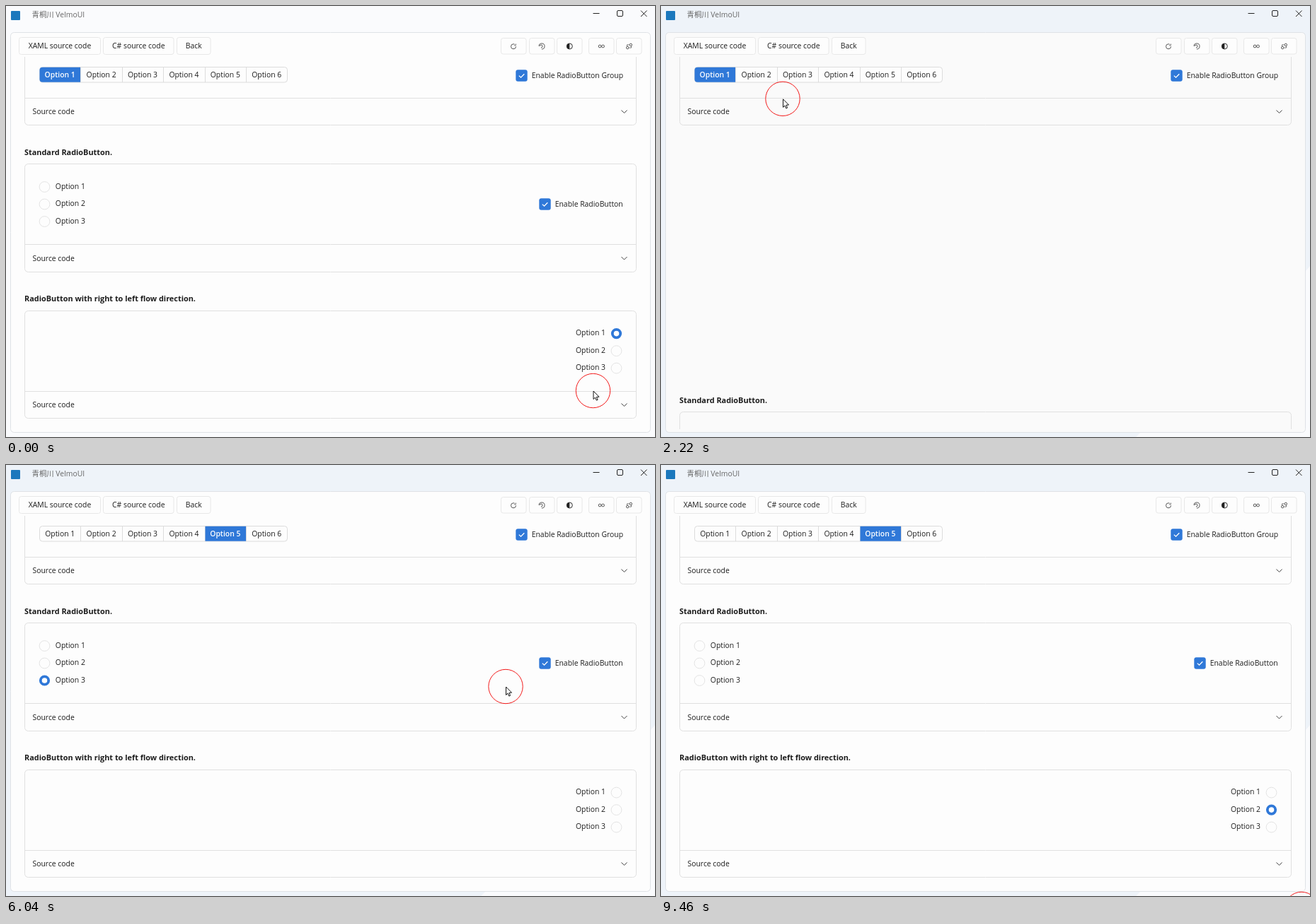
Animation, 917 px wide and 610 px high, one loop 9620 ms. Source, as an HTML page with a canvas:

```html
<!DOCTYPE html>
<html lang="en">
<head>
<meta charset="utf-8">
<title>Radio buttons</title>
<style>
html, body { margin: 0; width: 100%; height: 100%; overflow: hidden; background: #eef3f9; }
canvas { display: block; width: 917px; height: 610px; }
</style>
</head>
<body>
<canvas id="stage" width="917" height="610"></canvas>
<script>
const g = document.getElementById('stage').getContext('2d');
const LOOP = 9620, SHIFT = 351, SEG = 58.4, ROW = 24.5;
const BLUE = '#2f78d8', LINE = '#e0e0e0', INK = '#1c1c1c', FACE = '#fdfdfd';
const SANS = '"Open Sans", "Noto Sans", "Noto Sans CJK SC", "Noto Sans CJK", sans-serif';
const MONO = '"DejaVu Sans Mono", monospace';

// Press time, release time, control: kind letter and index
const clicks = [
  [900, 1000, 'h0'], [1700, 1750, 'h0'], [2500, 2550, 'g1'], [2970, 3020, 'g2'], [3250, 3300, 'g3'],
  [4100, 4150, 'g4'], [4780, 4990, 's1'], [5150, 5250, 's0'], [5410, 5500, 's2'],
  [6400, 6500, 'e0'], [6950, 7000, 'e0'], [7180, 7660, 'r2'], [7880, 8000, 'r1']
];
const OPEN = clicks[0][1], CLOSE = clicks[1][1], SNAP = CLOSE + 550;

const spots = {
  h: () => [806, 154],
  g: i => [47 + SEG * (i + .45), 98],
  s: i => [90, 256 + ROW * i],
  r: i => [866, 463 + ROW * i],
  e: () => [789.5, 283]
};

// Arrival, departure, position; clicks supply the remaining stops
const path = [
  [0, 50, 829.5, 544.5], [300, 450, 777.5, 262.5], [2220, 2240, 172, 131.3], [3650, 3790, 354, 103],
  [4680, 4690, 118, 293], [5940, 5950, 640, 360], [6040, 6060, 706, 313.5], [8300, 8350, 850, 588],
  [8850, 8870, 735, 488], [9010, 9360, 740, 640], [9450, LOOP, 905, 628.5],
  ...clicks.map(([a, b, id]) => [a, b, ...spots[id[0]](+id[1])])
].sort((a, b) => a[0] - b[0]);

const code = `<Grid
  Margin="10"
 >
  <Grid.ColumnDefinitions>
    <ColumnDefinition
      Width="*" />
    <ColumnDefinition
      Width="Auto" />
  </Grid.ColumnDefinitions>
  <StackPanel
    Grid.Column="0">
    <ui:ButtonGroup
      HorizontalAlignment="Left"
      CornerRadius="5"
      Orientation="Horizontal"
      Layout="Uniform"
      IsEnabled="{Binding IsChecked,ElementName=RadioGroupButtonEnabled, Mode=OneWay}"
     >
      <RadioButton
        Content="Option 1"
        GroupName="radio_group_one"
        IsChecked="True" />
      <RadioButton
        Content="Option 2"
        GroupName="radio_group_one" />`.split('\n');

const clamp = v => Math.max(0, Math.min(1, v));
const done = (kinds, t) => clicks.filter(c => c[1] <= t && kinds.includes(c[2][0]));
const chosen = (kinds, t, first) => (done(kinds, t).pop() || [0, 0, first])[2];
const held = (id, t) => clicks.some(c => c[2] === id && t >= c[0] && t < c[1]);

function pointer(t) {
  const n = path.findIndex(p => p[0] > t);
  const a = path[(n < 0 ? path.length : n) - 1], b = n < 0 ? a : path[n];
  const k = clamp((t - a[1]) / (b[0] - a[1] || 1));
  return [2, 3].map(i => a[i] + (b[i] - a[i]) * k);
}

function text(s, x, cy, { color = INK, size = 10.4, weight = 400, align = 'left' } = {}) {
  g.font = `${weight} ${size}px ${SANS}`;
  g.fillStyle = color;
  g.textAlign = align;
  g.fillText(s, x, cy + 3.7);
}

function paint(fill, stroke, width = 1) {
  if (fill) { g.fillStyle = fill; g.fill(); }
  if (stroke) { g.strokeStyle = stroke; g.lineWidth = width; g.stroke(); }
}

function box(x, y, w, h, r, fill, stroke) {
  g.beginPath();
  g.roundRect(x, y, w, h, r);
  paint(fill, stroke);
}

function arc(x, y, r, from, to, fill, stroke, width) {
  g.beginPath();
  g.arc(x, y, r, from, to);
  paint(fill, stroke, width);
}

const disc = (x, y, r, ...style) => arc(x, y, r, 0, Math.PI * 2, ...style);

function poly(pts, color, width, fill) {
  g.beginPath();
  pts.forEach(p => g.lineTo(...p));
  if (fill) g.closePath();
  paint(fill, color, width);
}

function card(top, divider, bottom, open) {
  box(26.5, top, 864, bottom - top, 5, null, LINE);
  poly([[26.5, divider], [890.5, divider]], LINE);
  const y = (divider + bottom) / 2, d = open ? -2 : 2;
  text('Source code', 37.5, y);
  poly([[869.5, y - d], [873.5, y + d], [877.5, y - d]], '#444');
}

function check(x, y, on, label) {
  box(x + .3, y + .3, 16.4, 16.4, 3, on ? BLUE : '#fff', on ? null : '#c8c8c8');
  if (on) poly([[x + 4.8, y + 8.6], [x + 7.5, y + 11.2], [x + 12.3, y + 6.2]], '#fff', 1.3);
  text(label, x + 22.7, y + 8.5);
}

function radio(id, x, y, lx, align, t, enabled) {
  const down = held(id, t), dim = down || !enabled;
  if (chosen('sr', t, 'r0') === id) {
    disc(x, y, 5.7, '#fff', enabled ? BLUE : '#c4c4c4', 3.8);
  } else {
    disc(x, y, 7.4, dim ? '#e6e6e6' : FACE, dim ? '#c4c4c4' : '#e4e4e4');
    if (down) disc(x, y, 5, null, '#cfcfcf');
  }
  text('Option ' + (+id[1] + 1), lx, y - 1.2, { align, color: dim ? '#a4a4a4' : INK });
}

function listing() {
  g.font = `9.1px ${MONO}`;
  g.textAlign = 'left';
  const cw = g.measureText('0').width;
  code.forEach((row, i) => {
    for (const m of row.matchAll(/<[^>\s]*>?|\/?>|[\w.]+(?==)|="[^"]*"/g)) {
      const c = m[0][0];
      g.fillStyle = c === '=' ? '#00f' : /[<>\/]/.test(c) ? '#800080' : '#f00';
      g.fillText(m[0], 49.2 + m.index * cw, 220 + i * 11.67);
    }
  });
}

function details(alpha) {
  g.save();
  g.globalAlpha = alpha;
  box(26.5, 168.5, 864, 350, [0, 0, 5, 5], FACE, LINE);
  text('XAML', 37.5, 187.3, { size: 11, weight: 700 });
  box(872, 211, 4, 149, 2, '#d2d2d2');
  g.beginPath();
  g.rect(27, 200, 840, 295);
  g.clip();
  listing();
  g.restore();
}

function icons() {
  const ink = '#555', y = 57;
  [699.5, 739.5, 778.5, 823.5, 862.5].forEach(x => box(x, 45.5, 35.5, 22.5, 3, FACE, '#e8e8e8'));
  arc(717, y + .3, 3.5, 0, 5.2, null, ink);
  poly([[720.3, 53.5], [720.3, 55.8], [718, 55.8]], ink, .8);
  arc(757, y, 4, -3.1, 1.6, null, ink);
  arc(756, y, 2, -3.1, 1.6, null, ink);
  disc(796.3, y, 4, '#fff', '#333');
  arc(796.3, y, 4, Math.PI / 2, Math.PI * 1.5, '#222');
  for (const s of [-1, 1]) {
    disc(841.3 + s * 2.2, y, 1.9, null, ink);
    disc(880.5 + s * 2.3, y - s * 2.1, 1.7, null, ink);
    poly([[880.5, y - s * 2.1], [880.5 - s * 3, y - s * 2.1], [880.5 - s * 3, y]], ink, .8);
  }
}

function chrome(t) {
  const pale = '#fafbfd';
  g.fillStyle = t < OPEN ? pale : '#eef3f9';
  g.fillRect(0, 0, 917, 610);
  poly([[917, 368], [909, 377], [909, 603], [678, 603], [671, 610], [917, 610]], null, 1, pale);
  box(6.5, 37.5, 904, 566, 5, t > CLOSE && t < SNAP ? '#fafafa' : FACE, '#dfe2e6');
  box(7, 7, 13, 13, 1, '#1b78bd');
  text('青桐川 VelmoUI', 36.5, 12.7, { color: '#666' });
  poly([[829.5, 10.5], [838.5, 10.5]], '#222');
  box(863.5, 6.5, 8, 8, 1.5, null, '#222');
  for (const [a, b] of [[6.5, 15], [15, 6.5]]) poly([[897, a], [905.5, b]], '#222');
  [[18.5, 115, 'XAML source code'], [137.5, 99.5, 'C# source code'], [241.5, 47.5, 'Back']]
    .forEach(([x, w, s]) => {
      box(x, 44.5, w, 24, 3, FACE, '#e8e8e8');
      text(s, x + w / 2, 56.3, { align: 'center' });
    });
  icons();
}

function group(t) {
  const pick = +chosen('g', t, 'g0')[1];
  box(47.5, 86.5, 350, 21.5, 4, FACE, '#dcdcdc');
  for (let i = 0; i < 6; i++) {
    const x = 47 + i * SEG, edge = Math.round(x) + .5, on = i === pick;
    if (i) poly([[edge, 87], [edge, 108]], '#dcdcdc');
    if (on) box(edge, 86.8, SEG - .9, 21, i ? 0 : [4, 0, 0, 4], BLUE);
    text('Option ' + (i + 1), x + SEG / 2, 97.5,
      { align: 'center', color: on ? '#fff' : INK, weight: on ? 600 : 400 });
  }
}

function content(t) {
  const open = t >= OPEN && t < CLOSE, tall = t >= OPEN && t < SNAP;
  const enabled = done('e', t).length % 2 === 0;
  const title = { size: 10.9, weight: 700 };
  g.save();
  g.beginPath();
  g.rect(7, 72, 903, 527);
  g.clip();

  group(t);
  check(720, 90, true, 'Enable RadioButton Group');
  if (tall) details(open ? clamp((t - OPEN) / 450) : 1 - clamp((t - CLOSE) / 400));
  card(40.5, 130.5, 168.5, open);
  if (t >= OPEN && t < CLOSE + 50) {
    g.strokeStyle = '#ff9595';
    g.lineWidth = 1.8;
    g.strokeRect(38.3, 78, 840.6, 41);
  }

  g.translate(0, tall ? SHIFT : 0);
  text('Standard RadioButton.', 26, 206.8, title);
  card(223.5, 337.5, 376.5);
  text('RadioButton with right to left flow direction.', 26, 414.4, title);
  card(431.5, 545.5, 583.5);
  for (let i = 0; i < 3; i++) {
    radio('s' + i, 54.5, 256 + i * ROW, 69.8, 'left', t, enabled);
    radio('r' + i, 862.5, 463.6 + i * ROW, 847, 'right', t, true);
  }
  check(753, 272, enabled, 'Enable RadioButton');
  g.restore();
}

function hot(x, y) {
  const inside = (l, top, r, b) => x >= l && x <= r && y >= top && y <= b;
  return inside(47, 86, 397, 108) || inside(47, 246, 113, 314) ||
    inside(804, 454, 871, 521) || inside(753, 271, 871, 290);
}

function hand() {
  g.beginPath();
  g.moveTo(4, 11);
  g.lineTo(4, 2);
  g.quadraticCurveTo(5.2, -.6, 6.5, 2);
  g.lineTo(6.5, 6);
  for (let i = 0; i < 3; i++) g.quadraticCurveTo(7.8 + i * 2.1, 5 + i * .6, 8.8 + i * 2.1, 7 + i * .7);
  [[13, 12], [11.5, 15], [11.5, 17.5], [5, 17.5], [4.5, 15.5], [.5, 10.5]].forEach(p => g.lineTo(...p));
  g.quadraticCurveTo(1, 8, 4, 11);
  paint('#fff', '#111');
  for (let i = 0; i < 3; i++) poly([[6.6 + i * 2.2, 6 + i], [6.6 + i * 2.2, 10]], '#111', .8);
}

function cursor(t) {
  const [x, y] = pointer(t);
  disc(x, y, 24.2, null, '#f31919');
  g.save();
  g.translate(x, y);
  g.lineJoin = 'round';
  if (hot(x, y)) hand();
  else poly([[.5, .5], [.5, 12], [3, 9.6], [4.8, 13.6], [6.6, 12.8], [4.9, 8.9], [8.5, 8.7]],
    '#111', 1, '#fff');
  g.restore();
}

const start = performance.now();
function draw() {
  const t = (performance.now() - start) % LOOP;
  chrome(t);
  content(t);
  cursor(t);
  requestAnimationFrame(draw);
}
draw();
</script>
</body>
</html>
```
